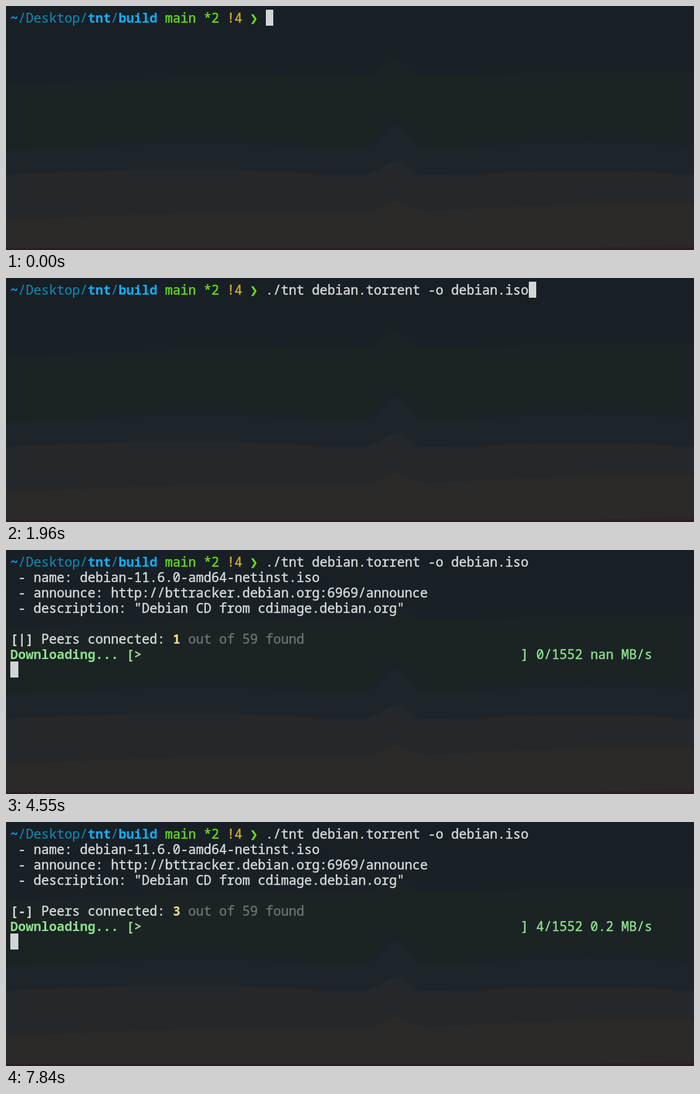
These frames come from a looping animation (1112x396 px, 8 s). An HTML page:

```html
<!DOCTYPE html>
<html lang="en">
<head>
<meta charset="utf-8">
<title>Terminal download</title>
<style>
  html, body { margin: 0; width: 100%; height: 100%; overflow: hidden; background: #181f25; }
  #stage { position: relative; width: 1112px; height: 396px; overflow: hidden; }
  #stage svg { position: absolute; inset: 0; }
  #floor { position: absolute; inset: 392px 0 0; background: #292024; }
  #screen span, #cursor { position: absolute; height: 26px; }
  #screen span {
    font: 20.8333px/26px "Noto Sans Mono", "DejaVu Sans Mono", monospace;
    font-variant-ligatures: none;
    -webkit-text-stroke: 0.5px currentColor;
    white-space: pre;
    color: #d5d8d7;
  }
  #cursor { width: 12.5px; background: #d1d5d5; }
  #screen .bold { font-weight: 700; -webkit-text-stroke: 0; }
  #screen .dir { color: #1286b1; -webkit-text-stroke: 0.2px; }
  #screen .anchor { color: #14aefa; }
  #screen .git { color: #62da1c; }
  #screen .dirty { color: #d5aa23; }
  #screen .count { color: #ffd98a; }
  #screen .dim { color: #6d7171; }
  #screen .load { color: #8bdf8b; }
</style>
</head>
<body>
<div id="stage">
  <svg id="hills" width="1112" height="396" viewBox="0 0 1112 396"></svg>
  <div id="floor"></div>
  <div id="screen"></div>
  <div id="cursor"></div>
</div>
<script>
const LOOP = 8000, WIDTH = 1112, CELL = 12.5, LINE = 25, LEFT = 7, TOP = 6;
const COMMAND = "./tnt debian.torrent -o debian.iso";
const INFO = [
  " - name: debian-11.6.0-amd64-netinst.iso",
  " - announce: http://bttracker.debian.org:6969/announce",
  ' - description: "Debian CD from cdimage.debian.org"'
];
const FRAME = 70, SPIN = 315, SPIN_START = 4235;
const COMPLETE = 1890, ENTER = 2380, INFO_SHOWN = 2450, CONNECTED = 3570;

// How many of the given moments have passed.
const passed = (t, ...moments) => moments.filter(at => t >= at).length;

// Ridges slope from left to right with a shared slow wave and one hump.
const RIDGES = [
  { fill: "#192026", left: 66, right: 50, wave: 1, hump: 8 },
  { fill: "#1b2324", left: 123, right: 106, wave: 2, hump: 28 },
  { fill: "#1d242a", left: 228, right: 226, wave: 5, hump: 38 },
  { fill: "#24282a", left: 268, right: 273, wave: 4, hump: 22 },
  { fill: "#2b2a28", left: 345, right: 321, wave: 3, hump: 17 },
  { fill: "#302426", left: 430, right: 386, wave: 0, hump: 0 }
];

function ridgeY({ left, right, wave, hump }, x) {
  const slope = left + (right - left) * x / WIDTH;
  const swell = wave * Math.cos((x - 300) / 102);
  return slope - swell - hump * Math.exp(-(((x - 628) / 28) ** 2));
}

function drawHills() {
  const hills = document.getElementById("hills");
  for (const ridge of RIDGES) {
    let d = "M0 396";
    for (let x = 0; x <= WIDTH; x += 4) d += `L${x} ${ridgeY(ridge, x).toFixed(1)}`;
    const path = document.createElementNS("http://www.w3.org/2000/svg", "path");
    path.setAttribute("d", d + `V396Z`);
    path.setAttribute("fill", ridge.fill);
    hills.append(path);
  }
}

const screen = document.getElementById("screen");
const cursor = document.getElementById("cursor");

function place(el, row, col) {
  el.style.left = LEFT + col * CELL + "px";
  el.style.top = TOP + row * LINE + "px";
}

// Writes [text, style] parts one after another from the first column.
function writeLine(row, ...parts) {
  let col = 0;
  for (const [text, style = ""] of parts) {
    const el = document.createElement("span");
    el.className = style;
    el.textContent = text;
    place(el, row, col);
    screen.append(el);
    col += text.length;
  }
  return col;
}

function writePrompt(typed) {
  return writeLine(0,
    ["~", "bold anchor"], ["/Desktop/", "dir"], ["tnt", "bold anchor"], ["/", "dir"], ["build", "bold anchor"],
    [" main *2", "git"], [" !4", "dirty"], [" ", ""], ["❯", "git"], [" "], [typed]);
}

function writeProgress({ turn, peers, pieces }) {
  const spinner = turn ? "\\|/-"[(turn - 1) % 4] : "x";
  const speed = pieces ? (pieces * 0.06).toFixed(1) : "nan";
  writeLine(5, [`[${spinner}]`, "bold"], [" Peers connected: "], [`${peers}`, "bold count"], [" out of 59 found", "dim"]);
  writeLine(6, ["Downloading... [>".padEnd(66), "bold load"], [`] ${pieces}/1552 ${speed} MB/s`, "load"]);
}

function stateAt(time) {
  const t = Math.floor(time / FRAME) * FRAME;
  return {
    typed: t < COMPLETE ? passed(t, 280, 490, 700, 840, 1190, 1330, 1680) : COMMAND.length,
    row: t >= CONNECTED ? 7 : t >= INFO_SHOWN ? 4 : t >= ENTER ? 1 : 0,
    turn: Math.max(0, Math.floor((t - SPIN_START) / SPIN) + 1),
    peers: passed(t, 4200, 6440, 7420),
    pieces: passed(t, 5530, 7420, 7840, 7840)
  };
}

let shown = "";

function render(time) {
  const state = stateAt(time);
  const key = Object.values(state).join();
  if (key === shown) return;
  shown = key;
  screen.replaceChildren();
  const end = writePrompt(COMMAND.slice(0, state.typed));
  if (state.row >= 4) INFO.forEach((line, i) => writeLine(i + 1, [line]));
  if (state.row === 7) writeProgress(state);
  place(cursor, state.row, state.row ? 0 : end);
}

drawHills();
render(0);
const start = performance.now();
function tick() {
  render((performance.now() - start) % LOOP);
  requestAnimationFrame(tick);
}
requestAnimationFrame(tick);
</script>
</body>
</html>
```
